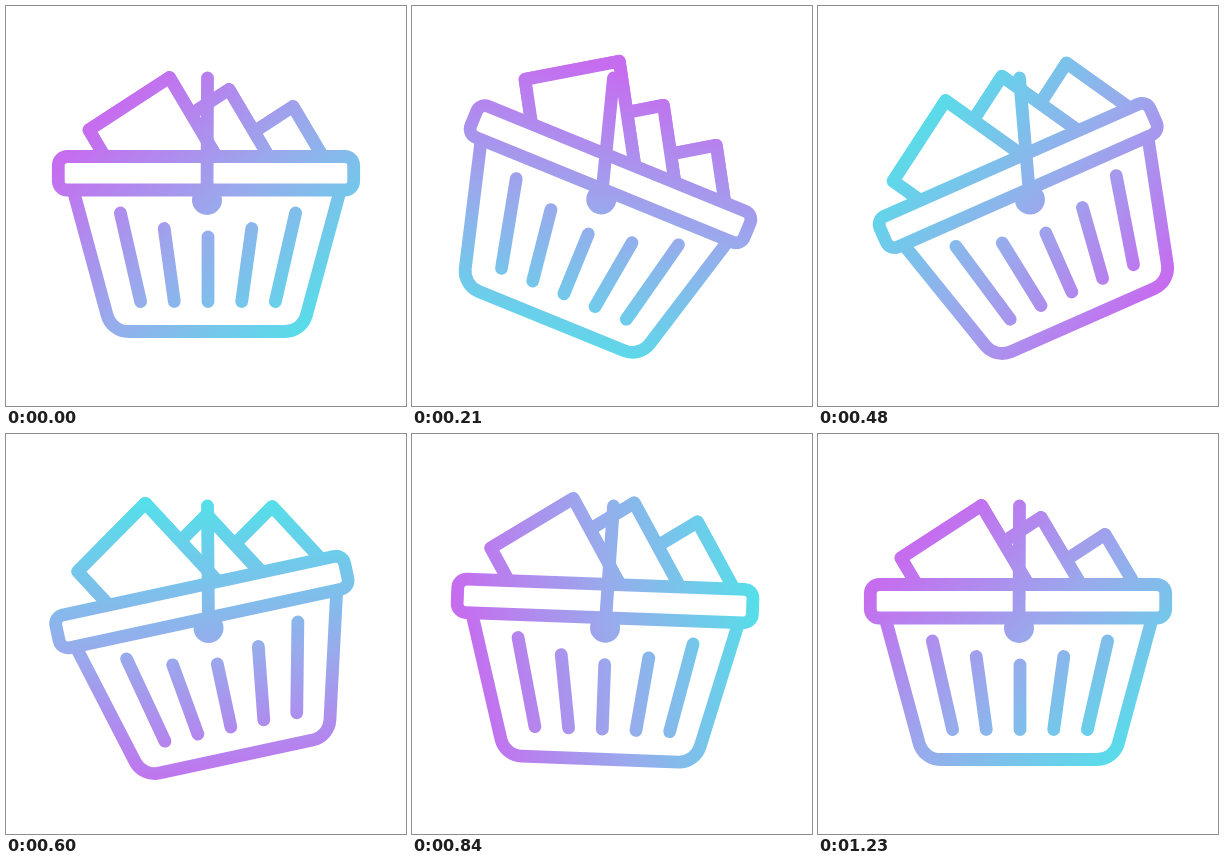
An HTML page with a canvas that plays this animation: 400x400 px, repeating every 3260 ms.

```html
<!DOCTYPE html>
<html lang="en">
<head>
<meta charset="utf-8">
<title>Swinging basket</title>
<style>
  html, body { margin: 0; width: 100%; height: 100%; overflow: hidden; background: #fff; }
  canvas { display: block; width: 100vw; height: 100vh; object-fit: contain; }
</style>
</head>
<body>
<canvas id="stage" width="400" height="400"></canvas>
<script>
const ctx = document.getElementById('stage').getContext('2d');
const LOOP = 3260, STEP = 30, END = 1230, BEAT = END / 5, RAD = Math.PI / 180;
const PIVOT = { x: 201.5, y: 72 }, HUB = { x: 201, y: 194 };

// Degrees reached at each beat.
const HANDLE = [0, 5.8, -5.2, 5.9, 0, 0];
const BASKET = [0, 23.4, -24.1, 5.4, -3.5, 0];

// Top corner and width of each box, back to front.
const BOXES = [
  { x: 287, y: 100.5, w: 52 },
  { x: 223, y: 83.5, w: 56 },
  { x: 163.5, y: 71.5, w: 96 }
];

const ease = p => (1 - Math.cos(Math.PI * p)) / 2;

function swing(peaks, t) {
  const i = Math.min(Math.floor(t / BEAT), peaks.length - 2);
  return peaks[i] + (peaks[i + 1] - peaks[i]) * ease(t / BEAT - i);
}

// Two bounces of equal height.
function hop(t) {
  const n = (t - 110) / 385;
  return n > 0 && n < 2 ? 16.8 * Math.abs(Math.sin(Math.PI * n)) : 0;
}

function line(...points) {
  ctx.beginPath();
  for (const [x, y] of points) ctx.lineTo(x, y);
  ctx.stroke();
}

function rotateAt({ x, y }, degrees) {
  ctx.translate(x, y);
  ctx.rotate(degrees * RAD);
  ctx.translate(-x, -y);
}

function drawBox({ x, y, w }, lift) {
  x += lift * 0.16;
  y -= lift;
  const left = [x - w * 0.838, y + w * 0.546];
  const down = ([px, py]) => [px + 64, py + 108];
  line(down(left), left, [x, y], down([x, y]));
  ctx.globalCompositeOperation = 'destination-out';
  ctx.fill();
  ctx.globalCompositeOperation = 'source-over';
  ctx.stroke();
}

function drawBoxes(t) {
  ctx.save();
  ctx.beginPath();
  ctx.rect(-100, -200, 600, 350);
  ctx.clip();
  BOXES.forEach((box, i) => drawBox(box, hop(t - (2 - i) * 100)));
  ctx.restore();
}

function drawBasket() {
  ctx.beginPath();
  ctx.roundRect(52.3, 150.5, 295.4, 33.5, 9);
  ctx.stroke();

  ctx.beginPath();
  ctx.moveTo(68, 187);
  ctx.arcTo(105.5, 325.5, 200, 325.5, 22);
  ctx.arcTo(296, 325.5, 333.5, 187, 22);
  ctx.lineTo(333.5, 187);
  ctx.stroke();

  for (let i = -2; i <= 2; i++) {
    line([202 + i * 43.8, 231 - 8.5 * Math.abs(i) ** 1.5], [202 + i * 33.7, 295.5]);
  }
}

function drawHandle() {
  line([PIVOT.x, PIVOT.y], [HUB.x, HUB.y]);
  ctx.beginPath();
  ctx.arc(HUB.x, HUB.y, 15, 0, 2 * Math.PI);
  ctx.fill();
}

function tint(t) {
  const angle = (45 + 360 * ease((t / END) ** 0.76)) * RAD;
  const dx = 150 * Math.cos(angle), dy = 150 * Math.sin(angle);
  const g = ctx.createLinearGradient(204 - dx, 217 - dy, 204 + dx, 217 + dy);
  g.addColorStop(0, '#c66cef');
  g.addColorStop(0.5, '#98abec');
  g.addColorStop(1, '#55dfe9');
  ctx.globalCompositeOperation = 'source-in';
  ctx.fillStyle = g;
  ctx.fillRect(0, 0, 400, 400);
  ctx.globalCompositeOperation = 'destination-over';
  ctx.fillStyle = '#fff';
  ctx.fillRect(0, 0, 400, 400);
}

function draw(t) {
  const handle = swing(HANDLE, t), basket = swing(BASKET, t);
  ctx.reset();
  ctx.lineWidth = 12.8;
  ctx.lineCap = ctx.lineJoin = 'round';
  ctx.save();
  rotateAt(PIVOT, handle);
  ctx.save();
  rotateAt(HUB, basket - handle);
  drawBoxes(t);
  drawBasket();
  ctx.restore();
  drawHandle();
  ctx.restore();
  tint(t);
}

const start = performance.now();
function tick() {
  const t = (performance.now() - start) % LOOP;
  draw(Math.min(END, Math.floor(t / STEP) * STEP));
  requestAnimationFrame(tick);
}
tick();
</script>
</body>
</html>
```
